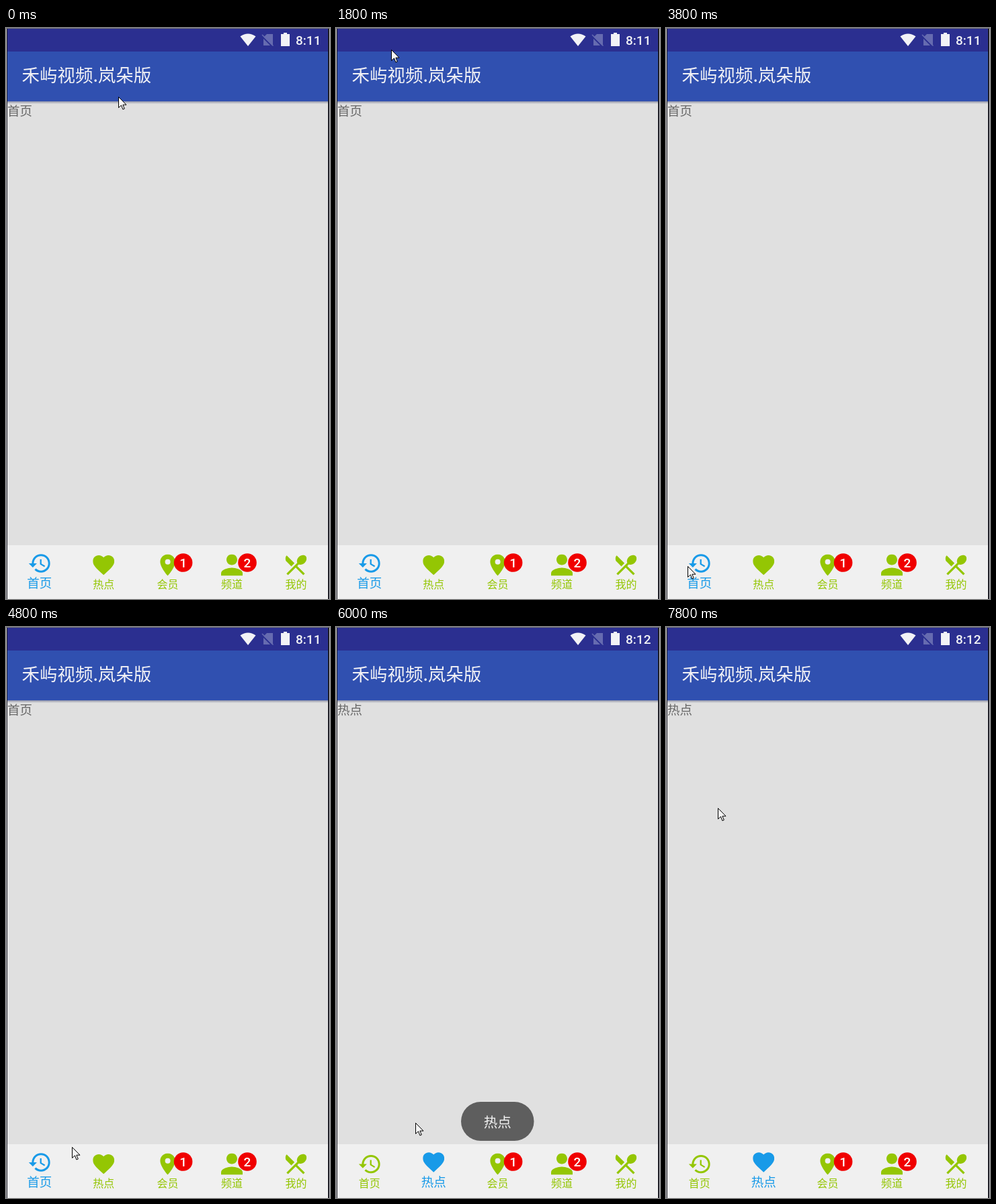
An HTML page for the animation above (8 s loop, 482 px wide and 849 px high).

```html
<!DOCTYPE html>
<html lang="zh-CN">
<head>
<meta charset="utf-8">
<title>禾屿视频</title>
<style>
  html, body { margin: 0; width: 100%; height: 100%; overflow: hidden; background: #e0e0e0; }
  svg { display: block; }
  #stage { width: 100vw; height: 100vh; }
  text { font-family: "Noto Sans CJK SC", "Noto Sans CJK", sans-serif; font-weight: 500; }
  .latin { font-family: Roboto, sans-serif; }
  .mid { text-anchor: middle; }
</style>
</head>
<body>
<svg id="stage" viewBox="0 0 482 849">
  <defs>
    <linearGradient id="shade" x2="0" y2="1">
      <stop stop-color="#8f93a8"/><stop offset="1" stop-color="#e0e0e0"/>
    </linearGradient>
  </defs>
  <rect width="482" height="849" fill="#e0e0e0"/>
  <rect width="482" height="35" fill="#2b2f90"/>
  <rect y="35" width="482" height="74" fill="#3050b0"/>
  <rect y="109" width="482" height="4" fill="url(#shade)"/>
  <rect y="769" width="482" height="80" fill="#f0f0f0"/>

  <g fill="#f2f2f6">
    <path d="M348.5 12.5Q360 4.5 371.5 12.5L360 27Z"/>
    <path d="M409 9h4v-2h5v2h4v18h-13z"/>
    <text id="clock" class="latin" x="431" y="25" font-size="19"></text>
    <text x="23.5" y="79.5" font-size="26.5">禾屿视频.岚朵版</text>
  </g>
  <path d="M388 9h9v17h-14V14z" fill="#666bb0"/>
  <path d="M380 11.5l17 17" stroke="#2b2f90" stroke-width="2"/>
  <path d="M381 10l16.5 16.5" stroke="#666bb0" stroke-width="1.6"/>

  <text id="page" x="2" y="129.5" font-size="18.5" fill="#686868"></text>
  <g id="tabs"></g>
  <g id="badges"></g>
  <g id="toast">
    <rect x="186" y="706" width="108.5" height="58" rx="29" fill="#5e5e5e"/>
    <text class="mid" x="240.3" y="744" font-size="20.5" fill="#f2f2f2">热点</text>
  </g>

  <path d="M0 0H482V1H0Z" fill="#777"/>
  <path d="M1 1H2V849H1ZM479 1H481V849H479Z" fill="#1c1c24"/>
  <path d="M0 1H1V849H0ZM481 1H482V849H481Z" fill="#c8c8cc"/>
  <path id="cursor" d="M0 0V16L4 12.4 6.4 18.5 8.8 17.5 6.4 11.7H11.5Z" fill="#f6f6f6" stroke="#000" stroke-linejoin="round"/>
</svg>
<script>
const LOOP = 8000, STEP = 200, SWITCH = 5400;
const GREEN = '#94c603', BLUE = '#189ae8';
const $ = id => document.getElementById(id);

const tabs = [
  { name: '首页', box: '1 1.5 21 21', d: 'M13 3c-4.97 0-9 4.03-9 9H1l3.89 3.89.07.14L9 12H6c0-3.87 3.13-7 7-7s7 3.13 7 7-3.13 7-7 7c-1.93 0-3.68-.79-4.94-2.06l-1.42 1.42C8.27 19.99 10.51 21 13 21c4.97 0 9-4.03 9-9s-4.03-9-9-9zm-1 5v5l4.28 2.54.72-1.21-3.5-2.08V8H12z' },
  { name: '热点', box: '2 2.2 20 20', d: 'M12 21.35l-1.45-1.32C5.4 15.36 2 12.28 2 8.5 2 5.42 4.42 3 7.5 3c1.74 0 3.41.81 4.5 2.09C13.09 3.81 14.76 3 16.5 3 19.58 3 22 5.42 22 8.5c0 3.78-3.4 6.86-8.55 11.54L12 21.35z' },
  { name: '会员', box: '2 2 20 20', badge: 1, d: 'M12 2C8.13 2 5 5.13 5 9c0 5.25 7 13 7 13s7-7.75 7-13c0-3.87-3.13-7-7-7zm0 9.5a2.5 2.5 0 0 1 0-5 2.5 2.5 0 0 1 0 5z' },
  { name: '频道', box: '4 4 16 16', badge: 2, d: 'M12 12c2.21 0 4-1.79 4-4s-1.79-4-4-4-4 1.79-4 4 1.79 4 4 4zm0 2c-2.67 0-8 1.34-8 4v2h16v-2c0-2.66-5.33-4-8-4z' },
  { name: '我的', box: '2.6 2.5 19.4 19.4', d: 'M8.1 13.34l2.83-2.83L3.91 3.5c-1.56 1.56-1.56 4.09 0 5.66l4.19 4.18zm6.78-1.81c1.53.71 3.68.21 5.27-1.38 1.91-1.91 2.28-4.65.81-6.12-1.46-1.46-4.2-1.1-6.12.81-1.59 1.59-2.09 3.74-1.38 5.27L3.7 19.87l1.41 1.41L12 14.41l6.88 6.88 1.41-1.41L13.41 13l1.47-1.47z' }
];
const tabX = i => 49.8 + 95.4 * i;

$('tabs').innerHTML = tabs.map((tab, i) => `<g>
  <svg x="${tabX(i) - 16}" width="32" height="32" viewBox="${tab.box}"><path d="${tab.d}"/></svg>
  <text class="mid" x="${tabX(i)}">${tab.name}</text></g>`).join('');
$('badges').innerHTML = tabs.map((tab, i) => tab.badge ? `
  <circle cx="${tabX(i) + 23}" cy="795" r="13.8" fill="#f00000"/>
  <text class="latin mid" x="${tabX(i) + 23}" y="801.8" font-size="19" fill="#fff">${tab.badge}</text>` : '').join('');

// time, x, y of the pointer tip
const pointer = [
  [0, 167, 102], [1200, 43, 62], [1800, 82, 32], [2400, 18, 130],
  [3000, 138, 619], [3800, 32, 800], [4800, 98, 773],
  [5400, 140, 798], [6000, 118, 737], [7200, 41, 252], [7400, 28, 209], [7800, 77, 269]
];
const toastAlpha = [[SWITCH, 0], [5800, 1], [7400, 1], [7800, 0]];

const ease = p => p * p * (3 - 2 * p);

function sample(keys, t, curve = p => p) {
  const n = keys.findIndex(key => key[0] >= t);
  if (n < 0) return keys[keys.length - 1].slice(1);
  if (n === 0) return keys[0].slice(1);
  const a = keys[n - 1], b = keys[n], p = curve((t - a[0]) / (b[0] - a[0]));
  return a.slice(1).map((v, i) => v + (b[i + 1] - v) * p);
}

function selectTab(active) {
  [...$('tabs').children].forEach((group, i) => {
    const on = i === active, [icon, label] = group.children;
    group.setAttribute('fill', on ? BLUE : GREEN);
    icon.setAttribute('y', on ? 780 : 782.6);
    label.setAttribute('y', on ? 831.5 : 833);
    label.setAttribute('font-size', on ? 18.5 : 16);
  });
  $('page').textContent = tabs[active].name;
  $('clock').textContent = active ? '8:12' : '8:11';
}

let shown = -1;
function draw(now) {
  const t = Math.floor(now % LOOP / STEP) * STEP;
  const active = t < SWITCH ? 0 : 1;
  if (active !== shown) selectTab(shown = active);
  const [x, y] = sample(pointer, t, ease).map(Math.round);
  $('cursor').setAttribute('transform', `translate(${x + .5} ${y + .5})`);
  $('toast').setAttribute('opacity', sample(toastAlpha, t)[0]);
}

const start = performance.now();
function tick() {
  draw(performance.now() - start);
  requestAnimationFrame(tick);
}
tick();
</script>
</body>
</html>
```
